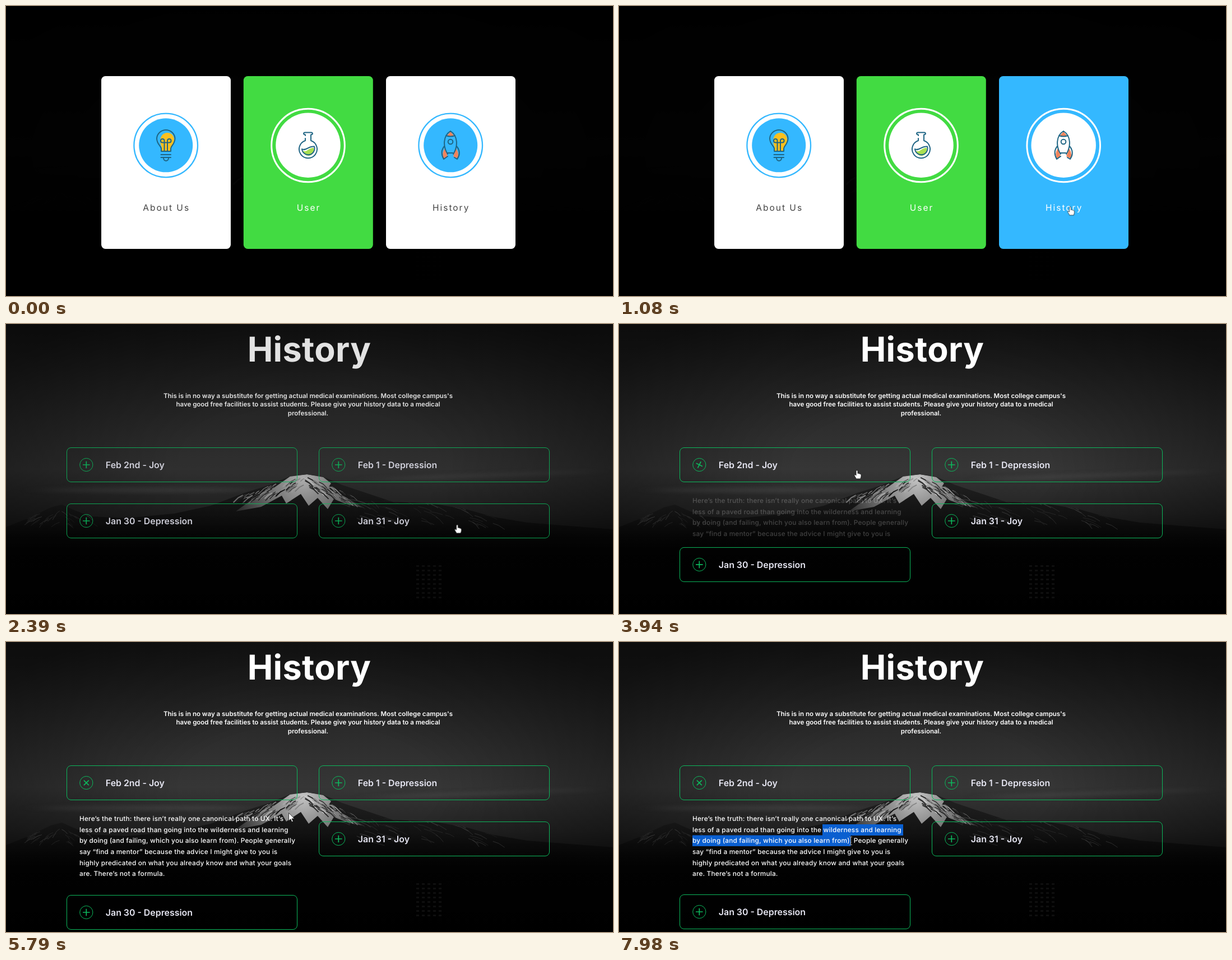
An HTML page for the animation above (8 s loop, 1083 px wide and 517 px high).

```html
<!DOCTYPE html>
<html lang="en">
<head>
<meta charset="utf-8">
<title>History cards</title>
<style>
html, body { margin: 0; width: 100%; height: 100%; overflow: hidden; background: #000; }
svg { display: block; width: 1083px; height: 517px; }
text {
  font-family: Inter, "Open Sans", sans-serif;
  font-optical-sizing: none;
  text-rendering: geometricPrecision;
  white-space: pre;
}
.mid { text-anchor: middle; }
.label { font-size: 15.5px; letter-spacing: 2px; }
.title { font-size: 61px; font-weight: 700; letter-spacing: .4px; fill: #fff; }
.intro { font-size: 11.5px; font-weight: 600; fill: #fff; }
.entry { font-size: 15.9px; font-weight: 600; fill: #e6e6f2; }
.body { font-size: 11.8px; font-weight: 500; letter-spacing: .2px; fill: #fff; }
.line { fill: none; stroke: #0cb85c; stroke-width: 1; }
.icon { fill: none; stroke: #1f6584; stroke-width: 2; stroke-linecap: round; stroke-linejoin: round; }
.icon .tint { stroke: none; }
</style>
</head>
<body>
<svg id="stage" viewBox="0 0 1083 517" xmlns="http://www.w3.org/2000/svg">
  <defs>
    <linearGradient id="sky" x2="0" y2="1">
      <stop offset="0" stop-color="#181818"/>
      <stop offset=".25" stop-color="#282828"/>
      <stop offset=".5" stop-color="#363636"/>
      <stop offset=".66" stop-color="#222"/>
    </linearGradient>
    <radialGradient id="edge" cx=".5" cy=".5" r=".62">
      <stop offset=".35" stop-opacity="0"/>
      <stop offset="1" stop-opacity=".45"/>
    </radialGradient>
    <linearGradient id="rock" gradientUnits="userSpaceOnUse" x1="0" y1="268" x2="0" y2="400">
      <stop offset="0" stop-color="#242424"/>
      <stop offset=".5" stop-color="#131313"/>
      <stop offset="1" stop-color="#050505"/>
    </linearGradient>
    <radialGradient id="snow" gradientUnits="userSpaceOnUse" cx="530" cy="275" r="135">
      <stop offset="0" stop-color="#c4c4c4"/>
      <stop offset=".4" stop-color="#8a8a8a"/>
      <stop offset="1" stop-color="#2a2a2a"/>
    </radialGradient>
    <linearGradient id="ground" gradientUnits="userSpaceOnUse" x1="0" y1="340" x2="0" y2="517">
      <stop offset="0" stop-opacity="0"/>
      <stop offset=".4" stop-opacity=".7"/>
      <stop offset="1"/>
    </linearGradient>
    <filter id="soft"><feGaussianBlur stdDeviation=".6"/></filter>
    <filter id="haze"><feGaussianBlur stdDeviation="20 3"/></filter>
    <clipPath id="ridgeClip"><path id="ridgeShape"/></clipPath>
    <clipPath id="panelClip"><rect id="panelBox" x="108" y="296" width="412"/></clipPath>
  </defs>
  <g id="photo"></g>
  <rect id="cover" width="1083" height="517"/>
  <g id="cards"></g>
  <g id="page"></g>
  <circle id="click" r="9.5" fill="#d6cd12" fill-opacity=".76"/>
  <g id="pointer">
    <path id="hand" transform="scale(.9)" fill="#fff" stroke="#111" stroke-width=".8" d="M-1.6 1a1.6 1.6 0 0 1 3.2 0V5.6c1-.8 2.5-.4 2.8.6 1-.5 2.2-.1 2.4.9.8-.3 1.5.1 1.5 1V11c0 2-1.3 3-1.3 5H-1.6C-1.6 14-5 11-5 9c0-1.5 1.9-1.3 3.4.5Z"/>
    <path id="arrow" fill="#fff" stroke="#111" stroke-width=".8" d="M0 0V14L3.3 11L5.5 16L7.7 15L5.5 10.2H10Z"/>
    <path id="beam" fill="none" stroke="#aaa" stroke-width="1" d="M-2.5-7H-.6L0-6.5.6-7H2.5M0-6.5V6.5M-2.5 7H-.6L0 6.5.6 7H2.5"/>
  </g>
</svg>
<script>
const LOOP = 8000;
const BLUE = [52, 184, 255], GREEN = [66, 219, 66], WHITE = [255, 255, 255], GREY = [68, 68, 68];
const $ = id => document.getElementById(id);
const set = (el, attrs) => { for (const k in attrs) el.setAttribute(k, attrs[k]); };
const clamp = v => Math.max(0, Math.min(1, v));
const lerp = (a, b, p) => a + (b - a) * p;
const mix = (a, b, p) => `rgb(${a.map((v, i) => Math.round(lerp(v, b[i], p)))})`;
const easeOut = (p, k) => 1 - (1 - p) ** k;

// Progress in equal jumps; the first jump is at `from`, the last at `to`.
function steps(t, from, to, n) {
  if (t < from) return 0;
  return clamp((Math.floor((t - from) / (to - from) * (n - 1) + .1) + 1) / n);
}

let seed = 11;
const rand = () => (seed = seed * 16807 % 2147483647) / 2147483647;

// ---------- Mountain backdrop ----------
const RIDGE = "M0 362L38 347L80 327L100 322L120 331L150 343L215 346L300 338L365 324L426 301"
  + "L470 287L505 272L537 268L565 272L600 287L645 302L690 317L760 320L820 330L870 344L930 354L1083 366V517H0Z";
const SNOW = "M508 271L537 268L566 273L580 284L572 296L592 302L640 328L610 322L585 312L574 330"
  + "L556 310L540 324L526 303L500 320L492 306L455 326L410 334L440 312L478 292Z";

function buildPhoto() {
  set($("ridgeShape"), { d: RIDGE });
  let streaks = "";
  const streak = (x, y, dx, dy, grey, w) => {
    streaks += `<path d="M${x} ${y}l${dx * .5} ${dy * .35}l${dx * .5} ${dy * .65}" stroke="rgb(${grey},${grey},${grey})" stroke-width="${w}"/>`;
  };
  const shade = (low, high) => Math.round(lerp(low, high, rand()));

  // Lit and shaded gullies below the summit
  for (let i = 0; i < 120; i++) {
    const far = rand(), side = rand() < .5 ? -1 : 1;
    const x = 532 + side * far * (side < 0 ? 115 : 85), y = 270 + far * 34 + rand() * 18;
    const size = 6 + rand() * 14;
    streak(x, y, side * size, size * .75, rand() < .5 ? shade(18, 50) : shade(90, 235 - far * 110), .8 + rand() * 1.4);
  }
  // Long right shoulder
  for (let i = 0; i < 60; i++) {
    const x = 580 + rand() * 290;
    streak(x, 308 + rand() * 48, 12 + rand() * 20, 5 + rand() * 8, shade(28, 65), 1);
  }
  // Small peak and left foothills
  for (let i = 0; i < 50; i++) {
    const x = 40 + rand() * 110;
    streak(x, 325 + rand() * 32, (x < 98 ? -1 : 1) * (6 + rand() * 10), 8, shade(24, 56), 1);
  }
  let windows = "";
  for (let i = 0; i < 40; i++)
    windows += `<rect x="${732 + i % 5 * 10}" y="${430 + Math.floor(i / 5) * 8}" width="5" height="3"/>`;
  $("photo").innerHTML = `
    <rect width="1083" height="517" fill="url(#sky)"/>
    <g filter="url(#haze)" fill="#4c4c4c" opacity=".5">
      <ellipse cx="850" cy="270" rx="200" ry="4" transform="rotate(-2 850 270)"/><ellipse cx="250" cy="296" rx="190" ry="5"/>
    </g>
    <rect width="1083" height="517" fill="url(#edge)"/>
    <path d="${RIDGE}" fill="url(#rock)"/>
    <g clip-path="url(#ridgeClip)">
      <g fill="none" filter="url(#soft)"><path d="${SNOW}" fill="url(#snow)"/>${streaks}</g>
    </g>
    <rect y="340" width="1083" height="177" fill="url(#ground)"/>
    <g fill="#0f0f0f">${windows}</g>`;
}

// ---------- Cards ----------
const ICONS = {
  bulb: `<path class="tint" fill="#fbc01e" d="M278 259V252C272 240 276 226 288 226C298 226 302 236 299 243C297 249 294 251 294 259Z"/>
    <path d="M277 259V254C276 249 269 246 269 236A16.3 16.3 0 0 1 301.500 236C301.500 246 294.500 249 294 254V259ZM282.500 259V240A3.300 3.300 0 1 0 279.200 243.500H291.300A3.300 3.300 0 1 0 288 240V259M276.500 265H294M276.500 270H294M281 271a4.500 5 0 0 0 9 0"/>`,
  flask: `<path class="tint" fill="#a9df52" d="M530 258C537 262 540 252 549 253C551 262 545 267 539 267C534 267 531 263 530 258Z"/>
    <path d="M534 231V229.500Q531 229 531 227.500T533 225.500H545Q547 226 547 227.500T544 229.500V240A16 16 0 1 1 534 240V236M528 255C535 259 540 249 550 250.500M528 255A11.300 11.300 0 1 0 550 250.500"/>`,
  rocket: `<path class="tint" fill="#f0845c" d="M786 232L793 224L800 232ZM783 254L788 268L781 272Q777 262 783 254ZM803 254L798 268L806 272Q809 262 803 254Z"/>
    <path d="M788 264C779 250 780 231 793 223C806 231 807 250 798 264M785 231Q793 234 801 231M787 262H797M782 250C777 256 776 264 781 273L788 268M804 250C809 256 811 264 805 273L800 270"/>
    <circle cx="793" cy="242" r="4.300"/>`
};

function makeCard(x, name, icon, accent) {
  const g = document.createElementNS("http://www.w3.org/2000/svg", "g");
  const cx = x + 115.2;
  g.innerHTML = `<rect x="${x}" y="125" width="231" height="308" rx="7.500"/>
    <circle cx="${cx}" cy="248.500" fill="none"/><circle cx="${cx}" cy="248.300"/>
    <g class="icon">${ICONS[icon]}</g>
    <text class="label mid" x="${cx + 1}" y="365">${name}</text>`;
  $("cards").append(g);
  const [box, ring, disc, , label] = g.children;
  return p => {
    set(box, { fill: mix(WHITE, accent, p) });
    set(ring, { r: lerp(56.8, 65.3, p), stroke: mix(accent, WHITE, p), "stroke-width": lerp(2.3, 3, p) });
    set(disc, { r: lerp(48, 57.7, p), fill: mix(accent, WHITE, p) });
    set(label, { fill: mix(GREY, WHITE, p) });
  };
}

// ---------- History page ----------
const INTRO = ["This is in no way a substitute for getting actual medical examinations. Most college campus's",
  "have good free facilities to assist students. Please give your history data to a medical", "professional."];
const BODY = ["Here’s the truth: there isn’t really one canonical path to UX. It’s",
  "less of a paved road than going into the wilderness and learning",
  "by doing (and failing, which you also learn from). People generally",
  "say “find a mentor” because the advice I might give to you is",
  "highly predicated on what you already know and what your goals", "are. There’s not a formula."];

const entry = (id, x, y, name) => `<g id="${id}" transform="translate(${x} ${y})">
  <rect class="line" x=".5" y=".5" width="411" height="61" rx="7.500"/>
  <circle class="line" cx="35.300" cy="31" r="11.600"/>
  <path class="line" style="stroke-width:1.700" d="M29 31H41.600M35.300 24.700V37.300"/>
  <text class="entry" x="69.800" y="36.600">${name}</text></g>`;

function buildPage() {
  const lines = (list, cls, x, y, gap) =>
    list.map((s, i) => `<text class="${cls}" x="${x}" y="${y + i * gap}">${s}</text>`).join("");
  $("page").innerHTML = `<text class="title mid" x="541" y="67">History</text>
    ${lines(INTRO, "intro mid", 539, 131.8, 15.4)}
    ${entry("joy", 108, 220, "Feb 2nd - Joy")}${entry("feb1", 558, 220, "Feb 1 - Depression")}
    ${entry("jan30", 108, 320, "Jan 30 - Depression")}${entry("jan31", 558, 320, "Jan 31 - Joy")}
    <g fill="#0a5fd0"><rect id="mark1" x="363" y="325" height="20"/><rect id="mark2" x="131" y="344.500" height="19.500"/></g>
    <g clip-path="url(#panelClip)"><g id="panel">${lines(BODY, "body", 131, 318.8, 19.7)}</g></g>`;
}

// ---------- Pointer ----------
// from, to, number of jumps, waypoints
const MOVES = [
  [220, 770, 8, [[914, 497], [880, 450], [835, 396], [805, 358.5]]],
  [2930, 3310, 6, [[805, 358.5], [640, 318], [490, 280], [424.5, 261.5]]],
  [5270, 6050, 11, [[424.5, 261.5], [500, 278], [570, 296], [450, 312], [332, 330]]],
  [6260, 6890, 9, [[332, 330], [345, 328], [362, 335]]],
  [7120, 7500, 6, [[362, 335], [390, 346], [413.5, 354.5]]]
];
const CLICKS = [[990, 1080], [3710, 3860], [6890, 7820]];

function along(points, p) {
  const s = p * (points.length - 1), i = Math.min(Math.floor(s), points.length - 2);
  return [0, 1].map(k => lerp(points[i][k], points[i + 1][k], s - i));
}

function pointerAt(t) {
  const move = MOVES.filter(m => t >= m[0]).pop();
  return move ? along(move[3], steps(t, ...move.slice(0, 3))) : null;
}

function pointerKind(t, x, y) {
  if (t < 2080) return y < 433 ? "hand" : "arrow";
  const inColumn = x > 108 && x < 520 || x > 558 && x < 970;
  const inRow = y > 220 && y < 282 || x > 558 && y > 320 && y < 382;
  if (inColumn && inRow) return "hand";
  return t > 5270 && x < 520 && y > 305 ? "beam" : "arrow";
}

function drawPointer(t) {
  const at = pointerAt(t);
  const pressed = CLICKS.some(([a, b]) => t >= a && t < b);
  set($("pointer"), { visibility: at ? "visible" : "hidden" });
  set($("click"), { visibility: at && pressed ? "visible" : "hidden" });
  if (!at) return;
  const [x, y] = at, kind = pointerKind(t, x, y);
  set($("pointer"), { transform: `translate(${x} ${y})` });
  set($("click"), { cx: x, cy: y });
  for (const id of ["hand", "arrow", "beam"]) $(id).style.display = id === kind ? "" : "none";
}

function drawSelection(t) {
  const [x, y] = t >= 7120 ? pointerAt(t) : [363, 0];
  const second = y >= 345;
  set($("mark1"), { width: second ? 144 : Math.max(0, x - 363) });
  set($("mark2"), { width: second ? x - 131 : 0 });
}

function render(t) {
  $("cards").style.display = t < 1300 ? "" : "none";
  historyCard(clamp((steps(t, 220, 770, 8) - .3) / .7));

  const shown = easeOut(steps(t, 2080, 2860, 11), 3.5);
  set($("cover"), { opacity: .95 * (1 - shown) });
  set($("page"), { opacity: shown });

  const open = easeOut(steps(t, 3860, 4410, 8), 3.14);
  const top = 320 + 131 * open - steps(t, 7820, 7980, 3);
  set($("jan30"), { transform: `translate(108 ${top})` });
  set($("panelBox"), { height: Math.max(0, top - 14 - 296) });
  set($("panel"), { opacity: steps(t, 3860, 4560, 9) });
  set($("joy").children[2], { transform: `rotate(${45 * open} 35.3 31)` });

  drawSelection(t);
  drawPointer(t);
}

buildPhoto();
buildPage();
makeCard(170, "About Us", "bulb", BLUE)(0);
makeCard(423.8, "User", "flask", GREEN)(1);
const historyCard = makeCard(678, "History", "rocket", BLUE);

const start = performance.now();
function tick() {
  render((performance.now() - start) % LOOP);
  requestAnimationFrame(tick);
}
tick();
</script>
</body>
</html>
```
